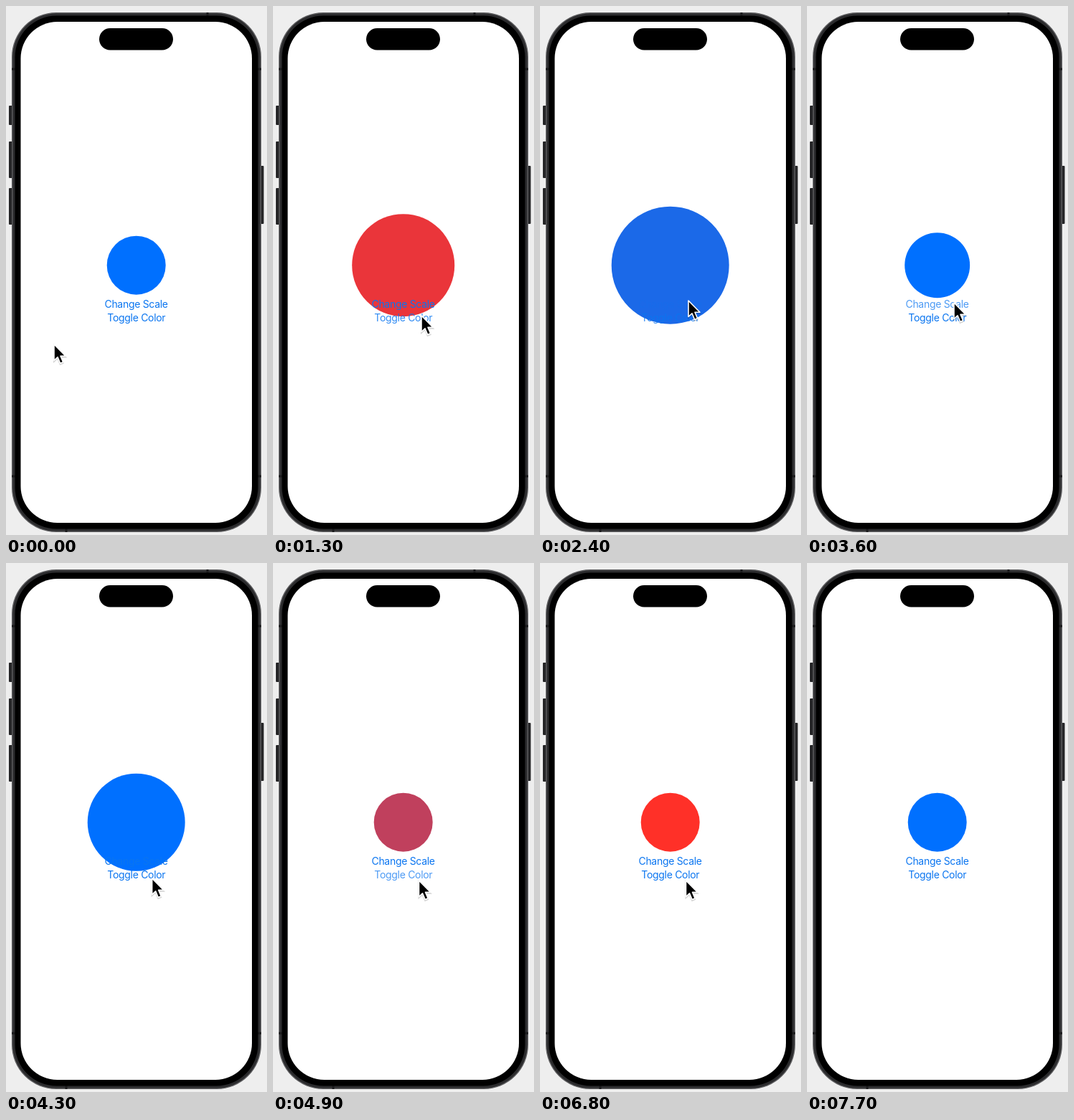
Recreate the animation shown at these times as an HTML page. Size 364 by 738 pixels, loop 7.8 s.

```html
<!DOCTYPE html>
<html lang="en">
<head>
<meta charset="utf-8">
<title>Scale and color</title>
<style>
  html, body { margin: 0; width: 100%; height: 100%; overflow: hidden; background: #eee; }
  svg { display: block; width: 364px; height: 738px; }
  text { font: 14px Inter, "Liberation Sans", sans-serif; letter-spacing: -.3px; fill: #0a75f0; text-anchor: middle; }
</style>
</head>
<body>
<svg viewBox="0 0 364 738">
  <g fill="#252527">
    <rect x="4" y="139" width="6" height="27" rx="1"/>
    <rect x="4" y="189" width="6" height="51" rx="1"/>
    <rect x="4" y="254" width="6" height="51" rx="1"/>
    <rect x="353" y="223" width="6.5" height="81" rx="1"/>
  </g>
  <rect x="8" y="9" width="348" height="725" rx="62" fill="#5a5a5c"/>
  <rect x="9.5" y="10.5" width="345" height="722" rx="60.5" fill="#2b2b2d"/>
  <path d="M281 9v5M84 729v5M8 88h5M351 88h5M8 656h5M351 656h5" stroke="#1b1b1d" stroke-width="3"/>
  <rect x="12.5" y="13.5" width="339" height="716" rx="58"/>
  <rect x="20.5" y="22" width="322.5" height="699" rx="51" fill="#fff"/>
  <rect x="130" y="31" width="103" height="30.5" rx="15.25"/>
  <circle id="disk" cx="181.7" cy="361.7" r="41"/>
  <text id="scaleLabel" x="181.6" y="421">Change Scale</text>
  <text id="colorLabel" x="181.8" y="439.5">Toggle Color</text>
  <g id="cursor">
    <path d="M0 0V22.5L5 17.8L8.6 26.4L12.6 24.7L9 16.2H16Z" transform="translate(0 1.5)" fill="#000" opacity=".16" stroke="#000" stroke-width="2"/>
    <path d="M0 0V22.5L5 17.8L8.6 26.4L12.6 24.7L9 16.2H16Z" stroke="#fff" stroke-width="1.6" stroke-linejoin="round"/>
  </g>
</svg>
<script>
const LOOP = 7800, STEP = 100, RADIUS = 41;
const GROW_TIME = 1000, COLOR_TIME = 350, HOLD = 70;
const BLUE = [0, 112, 255], RED = [255, 48, 40];
const scaleTaps = [650, 2470, 3370, 3900];
const colorTaps = [1020, 2130, 4670, 5320, 5970, 6950];
// time, x, y of the pointer tip
const pointer = [
  [0, 67, 472], [400, 207, 411], [700, 207, 411], [900, 207, 432],
  [2150, 207, 432], [2400, 207, 411], [3300, 205, 414], [3950, 205, 414],
  [4400, 203.5, 443], [LOOP, 203.5, 443]
];
const pointerGone = 7550;

const [disk, scaleLabel, colorLabel, cursor] =
  ["disk", "scaleLabel", "colorLabel", "cursor"].map(id => document.getElementById(id));

const clamp = v => Math.min(1, Math.max(0, v));
const mix = (a, b, p) => a + (b - a) * p;

// Cubic ease-in-out with handles at .42 and .58
function ease(p) {
  p = clamp(p);
  if (p === 0 || p === 1) return p;
  let lo = 0, hi = 1;
  for (let i = 0; i < 24; i++) {
    const u = (lo + hi) / 2, v = 1 - u;
    const x = 3 * v * v * u * .42 + 3 * v * u * u * .58 + u ** 3;
    if (x < p) lo = u; else hi = u;
  }
  return lo * lo * (3 - 2 * lo);
}

// Alternating taps add up, so a tap can overlap an unfinished change
const toggled = (t, taps, duration) =>
  taps.reduce((sum, tap, i) => sum + (i % 2 ? -1 : 1) * ease((t - tap) / duration), 0);

function labelOpacity(t, taps) {
  const tap = taps.findLast(time => t >= time - HOLD);
  return tap === undefined ? 1 : mix(.2, 1, clamp((t - tap) / 350));
}

function pointerAt(t) {
  const i = pointer.findIndex(k => k[0] > t);
  const [a, b] = [pointer[i - 1], pointer[i]];
  const p = ease((t - a[0]) / (b[0] - a[0]));
  return [mix(a[1], b[1], p), mix(a[2], b[2], p)];
}

function draw(t) {
  const red = clamp(toggled(t, colorTaps, COLOR_TIME));
  disk.setAttribute("r", RADIUS * (1 + toggled(t, scaleTaps, GROW_TIME)));
  disk.setAttribute("fill", `rgb(${BLUE.map((c, i) => Math.round(mix(c, RED[i], red)))})`);
  scaleLabel.setAttribute("opacity", labelOpacity(t, scaleTaps));
  colorLabel.setAttribute("opacity", labelOpacity(t, colorTaps));
  cursor.setAttribute("transform", `translate(${pointerAt(t)})`);
  cursor.setAttribute("visibility", t < pointerGone ? "visible" : "hidden");
}

const start = performance.now();
function tick() {
  const t = (performance.now() - start) % LOOP;
  draw(Math.floor(t / STEP) * STEP);
  requestAnimationFrame(tick);
}
tick();
</script>
</body>
</html>
```
